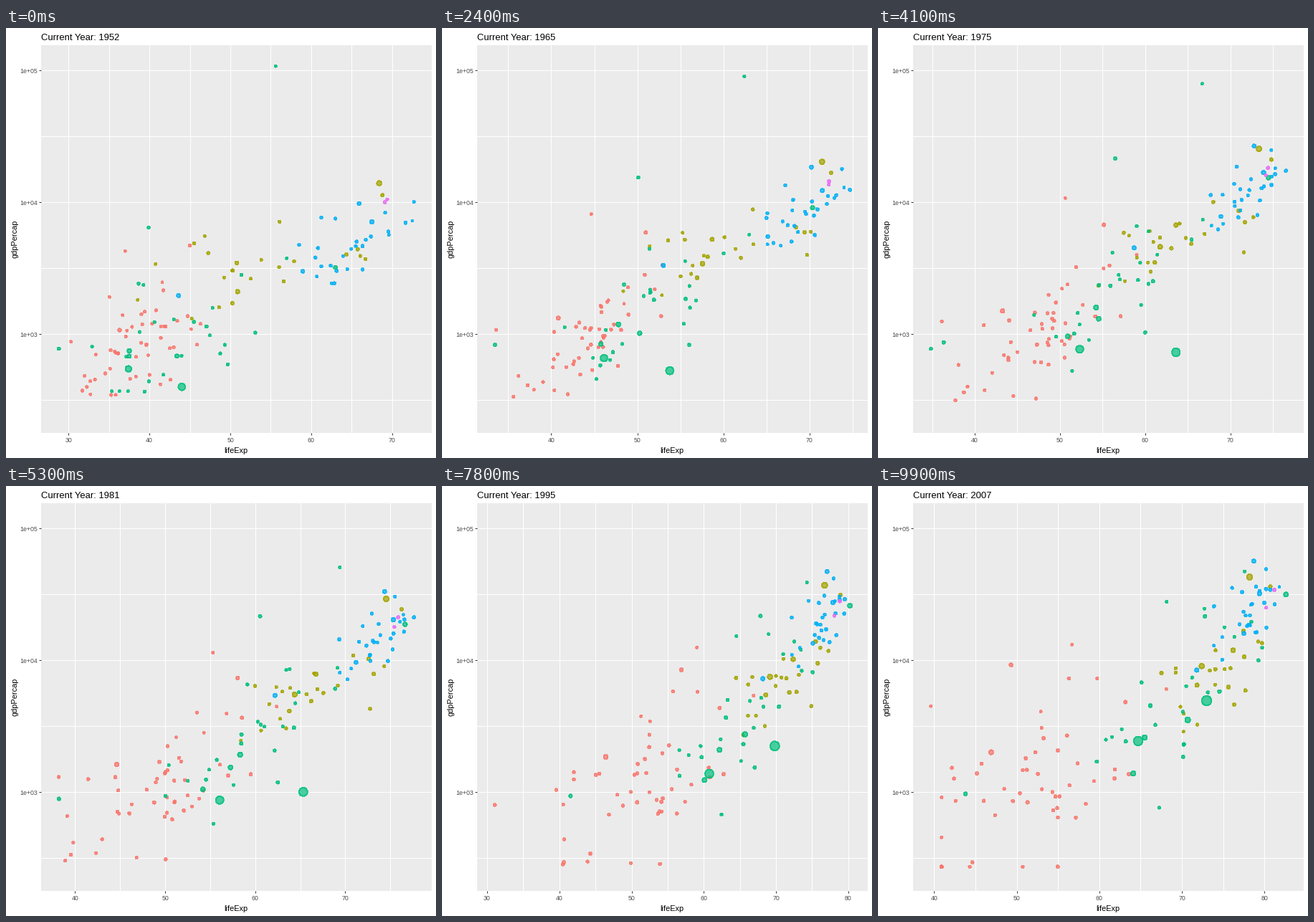
A matplotlib script for the animation above (10000 ms loop, 600 by 600 pixels).

```python
import matplotlib.pyplot as plt
import numpy as np
from matplotlib.animation import FuncAnimation
from matplotlib.ticker import MultipleLocator

FRAMES, FIRST, LAST = 100, 1952, 2007
PX = 0.72                                   # points per pixel at 100 dpi
U = np.linspace(0, 1, FRAMES)
YEAR = FIRST + (LAST - FIRST) * U
rng = np.random.default_rng(7)

plt.rcParams["font.family"] = "Liberation Sans"


def track(keys, bend=0):
    """Value in each frame: a bent ramp for two keys, else straight segments."""
    if len(keys) == 2:
        a, b = keys
        return a + (b - a) * U * (1 + bend * (1 - U))
    return np.interp(U, np.linspace(0, 1, len(keys)), keys)


def dip(start, low, end, depth):
    """A crisis: a sharp fall and recovery of life expectancy."""
    return np.interp(YEAR, [start, low, end], [0, -depth, 0])


class Region:
    def __init__(self, color, growth, life_bend, gdp_bend):
        self.color, self.growth = color, growth
        self.life_bend, self.gdp_bend = life_bend, gdp_bend
        self.dots = []

    def add(self, pop, life, gdp, fall=0):
        """pop in millions; life and gdp as evenly spaced key values."""
        pops = pop if isinstance(pop, tuple) else (pop / self.growth, pop)
        self.dots.append((track(life, self.life_bend) + fall,
                          track(np.log10(gdp), self.gdp_bend), track(pops)))

    def crowd(self, n, *spreads):
        """n seeded dots; spreads are (mean, sd) of life and log income,
        at the start and at the end, tied together by a shared wealth."""
        for _ in range(n):
            wealth = rng.normal()
            l0, l1, g0, g1 = (m + sd * np.clip(0.75 * wealth + 0.66 * rng.normal(), -1.7, 1.7)
                              for m, sd in spreads)
            pop = np.clip(8 * np.exp(rng.normal()), 0.5, 70)
            self.add(pop, (l0, l1), (10 ** g0, 10 ** g1))


africa = Region("#F8766D", 3.9, 1, 0.5)
africa.crowd(45, (39, 4.3), (54.5, 8), (3, 0.27), (3.15, 0.42))
africa.add(6, (30.3, 33, 35.9, 39.3, 39.6, 42.6), (880, 1350, 863))
africa.add(9, (40, 46), (493, 863), dip(1987, 1992, 2002, 22))
africa.add(12, (42, 46.4, 50.6, 51.2, 41.4, 42.4), (1147, 1271), dip(1997, 2002, 2007, 2.7))
africa.add(1, (41.4, 48.6, 58, 39.6), (1148, 4513))
africa.add(44, (45, 53.2, 61.2, 49.3), (4725, 9270))
africa.add(135, (36.3, 46.9), (1077, 2014))
africa.add(1.5, (37, 47.5, 60.4, 56.7), (4293, 10400, 12200, 13206))

americas = Region("#A3A500", 2.5, 0.37, 0.5)
americas.crowd(21, (53, 8.5), (73.5, 3.7), (3.48, 0.22), (3.85, 0.25))
americas.add((158, 301), (68.4, 78.2), (13990, 42952))
americas.add(190, (50.9, 72.4), (2109, 9066))
americas.add(109, (50.8, 76.2), (3478, 11978))
americas.add(33, (68.8, 80.7), (11367, 36319))

asia = Region("#00BF7D", 2.5, 0.37, 0.3)
asia.crowd(23, (46.5, 8), (71, 6), (3.13, 0.33), (3.7, 0.48))
asia.add((556, 1319),
         (44, 50.5, 44.5, 58.4, 63.1, 64, 65.5, 67.3, 68.7, 70.4, 72, 73),
         (400, 590, 1430, 4959))
asia.add((372, 1110), (37.4, 55.4, 64.7), (547, 710, 1000, 2452))
asia.add(127, (63, 69.3, 74.2, 77.8, 80.4, 82.6), (3217, 13500, 23300, 31656))
asia.add(2.5, (55.6, 77.6), (108382, 92000, 84000, 40000, 39000, 47307))
asia.add(14, (39.4, 59.7), (368, 1714), dip(1967, 1977, 1982, 19))
asia.add(32, (28.8, 43.8), (779, 975))
asia.add(223, (37.5, 70.7), (750, 3541))
asia.add(169, (43.4, 65.5), (685, 2606))
asia.add(150, (37.5, 64.1), (684, 1391))
asia.add(28, (39.9, 72.8), (6460, 21500, 21800, 21655))

europe = Region("#00B0F6", 1.3, 0.5, 0.65)
europe.crowd(26, (64.8, 4.2), (77.8, 2.3), (3.71, 0.19), (4.38, 0.22))
europe.add(0.3, (72.5, 73.7, 75.1, 77.1, 78.9, 81.8), (7268, 36181))
europe.add(4.6, (72.7, 73.5, 74.7, 75.9, 78.1, 80.2), (10095, 49357))
europe.add(82, (67.5, 79.4), (7144, 32170))
europe.add(71, (43.6, 71.8), (1969, 8458))

oceania = Region("#E76BF3", 2.2, 0.1, 0.3)
oceania.add(20, (69.1, 81.2), (10040, 34435))
oceania.add(4, (69.4, 80.2), (10557, 25185))

REGIONS = [africa, americas, asia, europe, oceania]
life, income, pop = np.array([d for r in REGIONS for d in r.dots]).swapaxes(0, 1)
colors = [r.color for r in REGIONS for _ in r.dots]
# dot area follows population
width = 0.75 * ((1 + 5 * np.sqrt(pop / pop.max())) * 2.845 + 0.945)

fig = plt.figure(figsize=(6, 6), dpi=100, facecolor="white")
ax = fig.add_axes([49 / 600, 35 / 600, 545 / 600, 541 / 600], facecolor="#EBEBEB")
ax.spines[:].set_visible(False)
ax.set_axisbelow(True)
ax.grid(which="both", color="white", lw=PX)
ax.xaxis.set_major_locator(MultipleLocator(10))
ax.xaxis.set_minor_locator(MultipleLocator(5))
ax.set_ylim(2.2527, 5.1929)
ax.set_yticks([3, 4, 5], ["1e+03", "1e+04", "1e+05"])
ax.set_yticks([2.5, 3.5, 4.5], minor=True)
ax.tick_params(length=3 * PX, width=PX, pad=2 * PX, color="#333333",
               labelcolor="#4D4D4D", labelsize=8.8 * PX)
ax.tick_params(axis="x", pad=3 * PX)
ax.tick_params(which="minor", length=0)


def label(x, y, text, size, **kw):
    return fig.text(x / 600, 1 - y / 600, text, fontsize=size * PX, **kw)


label(321, 593, "lifeExp", 11, ha="center", va="baseline")
label(13, 294.5, "gdpPercap", 11, ha="center", va="center", rotation=90)
title = label(49, 17, "", 13, ha="left", va="baseline")

points = ax.scatter(life[:, 0], income[:, 0], c=colors, alpha=0.7,
                    linewidths=0.94 * PX, antialiased=False)


def update(i):
    x = life[:, i]
    pad = 0.05 * np.ptp(x)
    ax.set_xlim(x.min() - pad, x.max() + pad)
    points.set_offsets(np.column_stack([x, income[:, i]]))
    points.set_sizes((width[:, i] * PX) ** 2)
    title.set_text(f"Current Year: {round(YEAR[i])}")
    return points, title


anim = FuncAnimation(fig, update, frames=FRAMES, interval=100, repeat=True)
plt.show()
```
